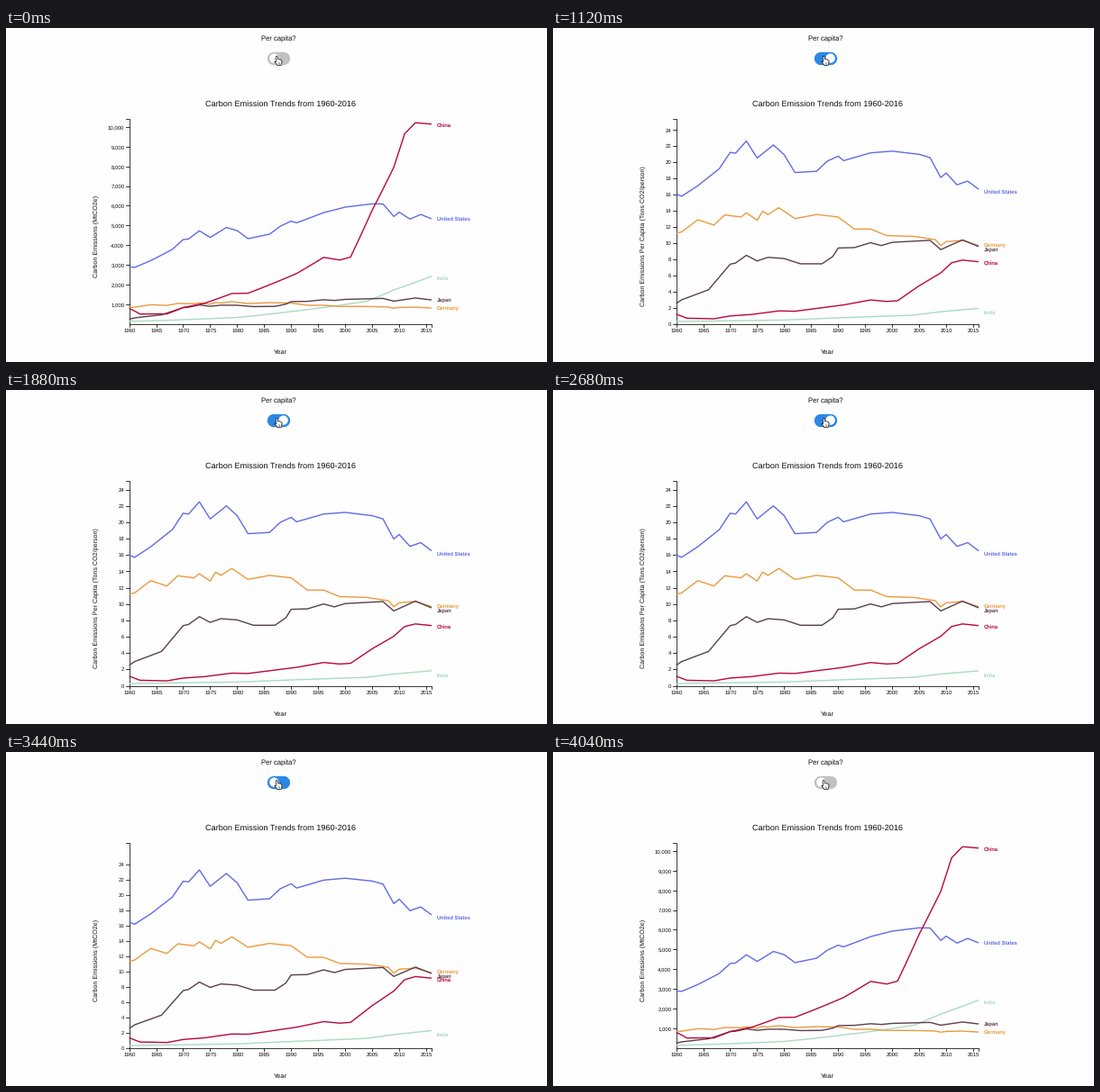
A matplotlib script for the animation above (4.08 s loop, 600 px wide and 371 px high).

```python
import numpy as np
import matplotlib.pyplot as plt
from matplotlib.animation import FuncAnimation
from matplotlib.colors import to_rgb
from matplotlib.patches import Circle, Polygon

W, H, DPI = 600, 371, 100
STEP, FRAMES = 40, 102
PT = 72 / DPI                        # points per pixel
LEFT, RIGHT, TOP, BASE = 136.6, 472, 101, 328.5
MAX_TOTAL, MAX_CAPITA = 10412, 25.05
OFF, ON, SWAP = 748, 3328, 437       # chart transition starts and length, ms
INK = "#0c0c0c"
GREY, BLUE = np.array(to_rgb("#c1c1c1")), np.array(to_rgb("#2b87e6"))

plt.rcParams.update({"font.family": "Liberation Sans", "text.hinting": "none"})
fig = plt.figure(figsize=(W / DPI, H / DPI), dpi=DPI, facecolor="#fefefe")
ax = fig.add_axes([0, 0, 1, 1])
ax.set(xlim=(0, W), ylim=(H, 0))
ax.axis("off")

span = np.linspace(0, 1, 57)         # 1960 to 2016
years = 1960 + np.arange(57)
xs = LEFT + span * (RIGHT - LEFT)


def scale(v, top):
    return BASE - v * (BASE - TOP) / top


def lerp(a, b, p):
    return a + (b - a) * p


def ease(s):
    s = min(max(s, 0), 1)
    return 4 * s ** 3 if s < 0.5 else 1 - 4 * (1 - s) ** 3


def there_and_back(t, start, back, length):
    return ease((t - start) / length) - ease((t - back) / length)


def text(x, y, s, px, color=INK, ha="center", rotation=0, **kw):
    """Text whose capitals are centred on (x, y)."""
    shift = 0.36 * px
    dx, dy = (shift, 0) if rotation else (0, shift)
    return ax.text(x + dx, y + dy, s, fontsize=px * PT, color=color, ha=ha,
                   va="baseline", rotation=rotation, rotation_mode="anchor", **kw)


def stroke(x, y, px, color=INK, **kw):
    return ax.plot(x, y, color=color, lw=px * PT, **kw)[0]


class Series:
    """A country: population growth curve and turning points of tonnes per person."""

    def __init__(self, name, color, label_dy, people, bend, turns):
        each = np.interp(years - 1900, list(turns), list(turns.values()))
        population = lerp(*people, span ** bend)
        self.total = scale(each * population, MAX_TOTAL)
        self.capita = scale(each, MAX_CAPITA)
        self.label_dy = label_dy
        self.line = stroke(xs, self.total, 1.4, color, solid_joinstyle="round",
                           solid_capstyle="butt", zorder=3)
        self.label = text(478, 0, name, 5.8, color, ha="left", weight="bold")

    def update(self, p):
        y = lerp(self.total, self.capita, p)
        self.line.set_ydata(y)
        self.label.set_y(y[-1] + lerp(*self.label_dy, p) + 0.36 * 5.8)


series = [
    Series("United States", "#5f6ce6", (0, 3), (180.7, 323), 1.08,
           {60: 16, 61: 15.7, 64: 17, 68: 19.1, 70: 21.1, 71: 21, 73: 22.5,
            75: 20.4, 78: 22, 80: 20.8, 82: 18.6, 86: 18.75, 88: 20, 90: 20.6,
            91: 20.05, 96: 21, 100: 21.2, 105: 20.8, 107: 20.4, 109: 17.95,
            110: 18.5, 112: 17.05, 114: 17.5, 116: 16.5}),
    Series("India", "#a9dcc0", (2, 4.6), (449, 1325), 1.16,
           {60: 0.27, 70: 0.36, 80: 0.45, 90: 0.71, 104: 1.03, 109: 1.43,
            116: 1.83}),
    Series("Germany", "#eb9b3f", (0, -1.3), (72.8, 82.3), 0.5,
           {60: 11.2, 61: 11.35, 64: 12.85, 67: 12.2, 69: 13.45, 72: 13.2,
            73: 13.7, 75: 12.8, 76: 13.9, 77: 13.5, 79: 14.35, 82: 13,
            86: 13.5, 90: 13.2, 93: 11.7, 96: 11.7, 99: 10.9, 104: 10.8,
            108: 10.4, 109: 9.65, 110: 10.15, 113: 10.3, 116: 9.68}),
    Series("Japan", "#5b404c", (0, 3), (92.5, 127), 0.35,
           {60: 2.5, 61: 2.95, 66: 4.2, 70: 7.35, 71: 7.5, 73: 8.45, 75: 7.75,
            77: 8.2, 80: 8.05, 83: 7.4, 87: 7.4, 89: 8.3, 90: 9.35, 93: 9.4,
            96: 10, 98: 9.65, 100: 10.05, 107: 10.3, 109: 9.15, 113: 10.35,
            116: 9.53}),
    Series("China", "#b8083f", (0.8, 1.5), (667, 1379), 0.71,
           {60: 1.17, 62: 0.67, 67: 0.6, 70: 0.94, 74: 1.12, 79: 1.54,
            82: 1.5, 91: 2.25, 96: 2.84, 99: 2.66, 101: 2.74, 105: 4.52,
            109: 6.05, 111: 7.24, 113: 7.56, 116: 7.36}),
]


class Tick:
    """A y-axis tick that slides from the total scale to the per-person scale."""

    def __init__(self, value, per_person):
        self.ends = scale(value, MAX_TOTAL), scale(value, MAX_CAPITA)
        self.per_person = per_person
        self.mark = stroke([LEFT - 3.6, LEFT], [0, 0], 0.8)
        self.label = text(131.4, 0, f"{value:,}", 6, ha="right")

    def update(self, p):
        y = lerp(*self.ends, p)
        alpha = p if self.per_person else 1 - p
        seen = alpha > 0.01 and 68 < y < 332
        self.mark.set_ydata([y, y])
        self.label.set_y(y + 0.36 * 6)
        for part in (self.mark, self.label):
            part.set_visible(seen)
            part.set_alpha(alpha)


ticks = [Tick(v, False) for v in range(1000, 10001, 1000)]
ticks += [Tick(v, True) for v in range(0, 25, 2)]

# Axes
stroke([LEFT - 3.6, LEFT, LEFT], [TOP, TOP, BASE], 0.8)
stroke([LEFT, RIGHT, RIGHT], [BASE, BASE, BASE + 3.6], 0.8)
for x, year in zip(xs[::5], years[::5]):
    stroke([x, x], [BASE, BASE + 3.6], 0.8)
    text(x + 0.4, 336, str(year), 6)

text(304, 84, "Carbon Emission Trends from 1960-2016", 9.1)
text(304.5, 359, "Year", 7.4)
text(302.5, 11.5, "Per capita?", 7.6)
y_title = text(98.5, 231.5, "", 7.2, rotation=90)

# Switch and pointer
KNOB_LEFT, KNOB_RIGHT, KNOB_Y = 297.4, 307.6, 33.6
pill = stroke([KNOB_LEFT, KNOB_RIGHT], [KNOB_Y, KNOB_Y], 14.4, GREY,
              solid_capstyle="round", zorder=4)
knob = ax.add_patch(Circle((KNOB_LEFT, KNOB_Y), 5.2, fc="white", ec="none", zorder=5))
hand = [(299.3, 32), (300.3, 31.1), (301.3, 32), (301.5, 34.6), (304.6, 35.1),
        (306.3, 37), (305, 41.6), (301, 41.6), (297.8, 37.4), (299.6, 37.5)]
ax.add_patch(Polygon(hand, fc="white", ec="#222222", lw=0.8 * PT,
                     joinstyle="round", zorder=6))
for x in (301.6, 303.1, 304.6):
    stroke([x, x], [37.6, 40.2], 0.5, "#555555", zorder=7)


def draw(i):
    t = i * STEP
    p = there_and_back(t, OFF, ON, SWAP)
    for item in series + ticks:
        item.update(p)
    slide = there_and_back(t, 650, 3280, 150)
    knob.center = (lerp(KNOB_LEFT, KNOB_RIGHT, slide), KNOB_Y)
    pill.set_color(lerp(GREY, BLUE, there_and_back(t, 800, 3440, 160)))
    y_title.set_text("Carbon Emissions Per Capita (Tons CO2/person)"
                     if OFF <= t < ON else "Carbon Emissions (MtCO2e)")


anim = FuncAnimation(fig, draw, frames=FRAMES, interval=STEP,
                     repeat=True, repeat_delay=0, blit=False)
plt.show()
```
